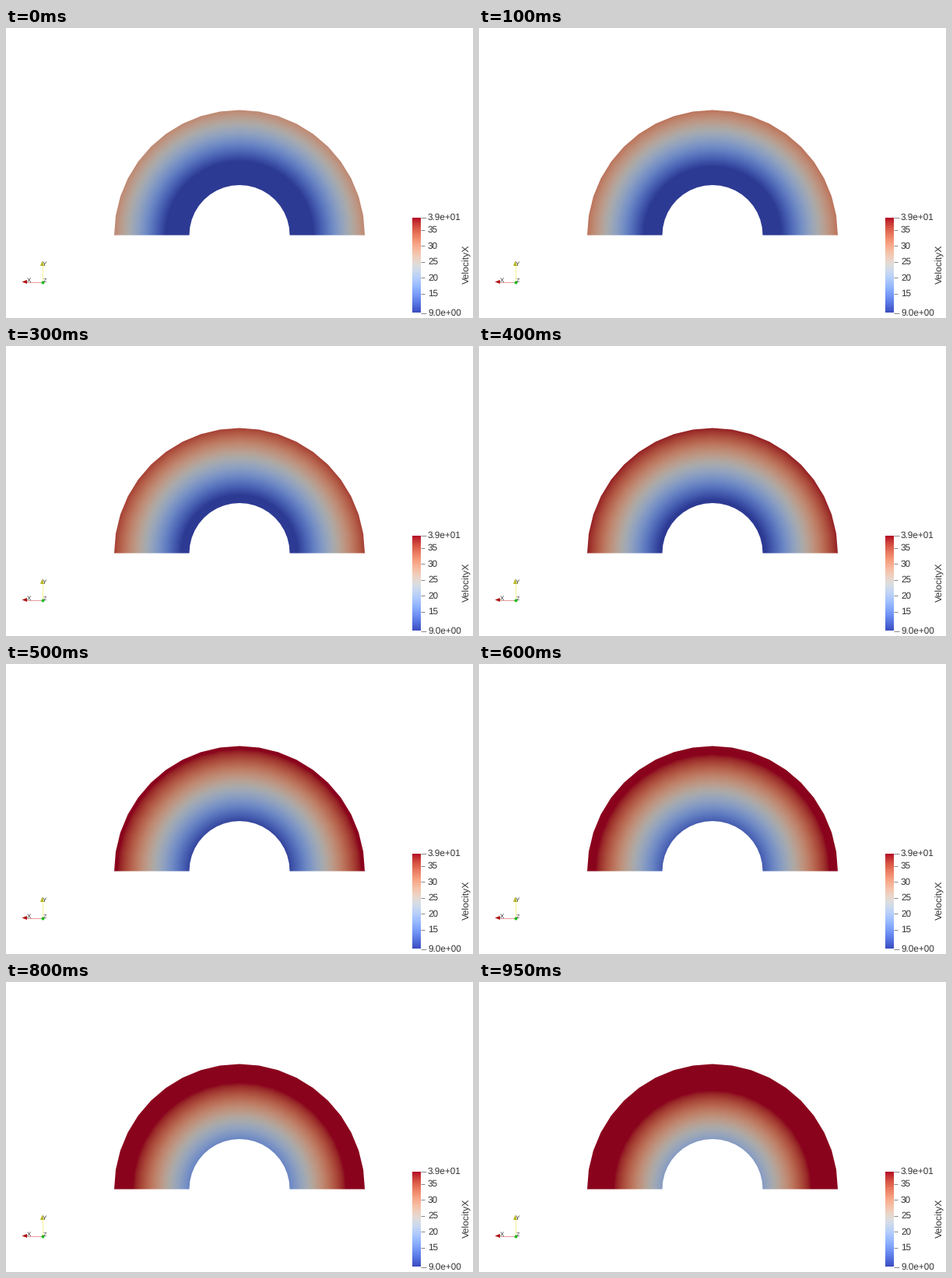
Animation of 600 by 373 pixels, one loop 1000 ms. Source, as a matplotlib script:

```python
import numpy as np
import matplotlib.pyplot as plt
from matplotlib.animation import FuncAnimation
from matplotlib.patches import Polygon

W, H, DPI = 600, 373, 64
FRAMES, INTERVAL = 20, 50
CX, CY, R_IN, R_OUT = 300, 266.5, 64.5, 161
FACET = np.pi / 20
SHADE = 0.77          # surface lighting
SPAN = 96             # radial distance covered by the colour range
START, SPEED = 95, 67
INK = "#333333"
COOLWARM = plt.get_cmap("coolwarm")

plt.rcParams["font.family"] = "Liberation Sans"
plt.rcParams["text.hinting"] = "none"
fig = plt.figure(figsize=(W / DPI, H / DPI), dpi=DPI, facecolor="white")
ax = fig.add_axes([0, 0, 1, 1])
ax.axis("off")


def pt(px):
    return px * 72 / DPI


def line(xs, ys, color, width=1):
    ax.plot(xs, ys, color=color, lw=pt(width), solid_capstyle="butt")


def label(x, y, text, size, **kw):
    ax.text(x, y, text, fontsize=pt(size), color=INK, **kw)


def arc(radius, angles):
    return np.column_stack([CX + radius * np.cos(angles),
                            CY - radius * np.sin(angles)])


# Half ring built from flat facets
angles = np.arange(21) * FACET
ring = Polygon(np.vstack([arc(R_OUT, angles), arc(R_IN, angles[::-1])]),
               fc="none", ec="none")
ax.add_patch(ring)

x0, x1, y0, y1 = 136, 464, 103, 270
px, py = np.meshgrid(np.arange(x0, x1) + 0.5, np.arange(y0, y1) + 0.5)
theta = np.arctan2(CY - py, px - CX)
radius = (np.hypot(px - CX, py - CY)
          * np.cos(theta % FACET - FACET / 2) / np.cos(FACET / 2))


def ring_colors(frame):
    zero_radius = START - SPEED * frame * INTERVAL / 1000
    value = np.clip((radius - zero_radius) / SPAN, 0, 1)
    return COOLWARM(value)[..., :3] * SHADE


surface = ax.imshow(ring_colors(0), extent=(x0, x1, y1, y0),
                    interpolation="nearest")
surface.set_clip_path(ring)

# Colour legend
TOP, BOTTOM = 243, 366
ax.imshow(np.linspace(1, 0, 256)[:, None], cmap=COOLWARM, aspect="auto",
          extent=(522, 533, BOTTOM, TOP + 1), interpolation="nearest")
for v in (39, 35, 30, 25, 20, 15, 9):
    y = BOTTOM - (v - 9) / 30 * (BOTTOM - TOP)
    end = v in (9, 39)
    tick_y = np.floor(y) + 0.5
    line([533, 540 if end else 538], [tick_y, tick_y], "#888888")
    label(542, y + 3.8, f"{v:.1e}" if end else str(v), 11.7)
label(592.5, 304, "VelocityX", 12.2, rotation=90, ha="center", va="center")

# Orientation axes
line([46.5, 46.5], [326, 306], "#f3f195")
line([46, 27], [326.5, 326.5], "#e59a9a")
ax.add_patch(Polygon([(46.5, 299.5), (44, 306), (49, 306)], fc="#b5b520"))
ax.add_patch(Polygon([(20.5, 326.5), (27, 324), (27, 329)], fc="#b01010"))
ax.plot(46.5, 326.5, "o", color="#20c020", ms=pt(4), mew=0)
label(47, 306, "Y", 8)
label(26.5, 327, "X", 8)
label(47.5, 327, "Z", 7)

ax.set(xlim=(0, W), ylim=(H, 0))
ax.set_aspect("auto")


def update(frame):
    surface.set_data(ring_colors(frame))
    return (surface,)


anim = FuncAnimation(fig, update, frames=FRAMES, interval=INTERVAL,
                     repeat=True, repeat_delay=0)
plt.show()
```
